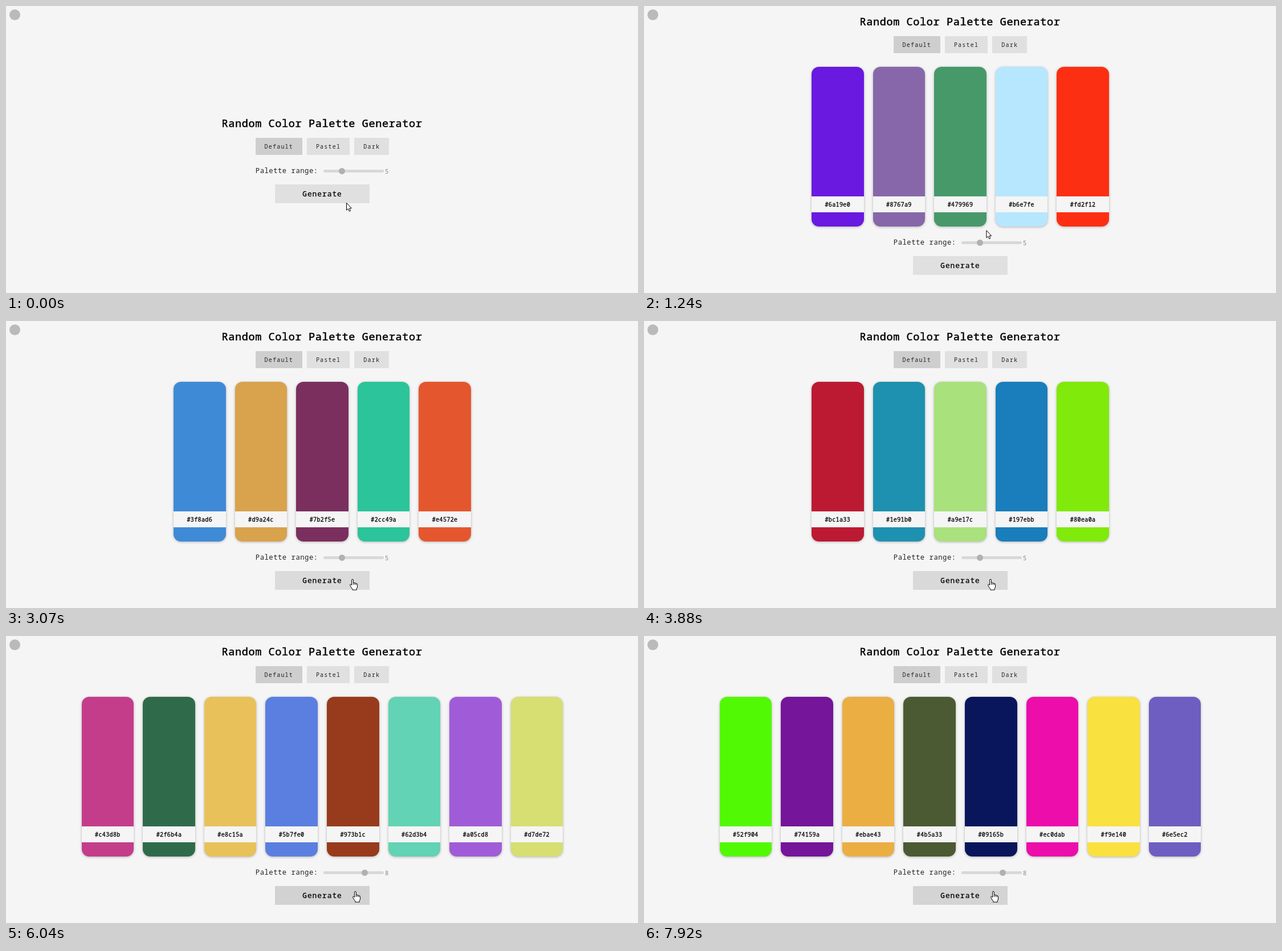
Recreate the animation shown at these times as an HTML page. Size 1109x505 px, loop 7.99 s.

```html
<!DOCTYPE html>
<html lang="en">
<head>
<meta charset="utf-8">
<title>Random Color Palette Generator</title>
<style>
  html, body { margin: 0; width: 100%; height: 100%; overflow: hidden; background: #f5f5f5; }
  body { position: relative; font-family: "Noto Sans Mono", "DejaVu Sans Mono", monospace; color: #111; }
  body * { box-sizing: border-box; }
  #stage div, #stage span { position: absolute; white-space: nowrap; }
  #stage { position: absolute; left: 0; top: 0; width: 1109px; height: 505px; overflow: hidden; }
  #badge { left: 6px; top: 6px; width: 19px; height: 19px; border-radius: 50%; background: #bababa; }
  #page, #cards, #lower { left: 0; top: 0; width: 1109px; height: 0; }
  #title, #go, .card span { color: #000; -webkit-text-stroke: .3px #000; }
  #title { left: 378.5px; top: 12px; line-height: 30px; font-size: 18.5px; letter-spacing: .63px; -webkit-text-stroke-width: .5px; }
  .tab { top: 53px; height: 30px; line-height: 30px; padding-left: 16.1px; font-size: 10px; letter-spacing: 1.2px; background: #e0e0e0; color: #222; }
  .tab.on { background: #cecece; }
  .card { top: 107px; width: 91.6px; height: 281px; border-radius: 13px; box-shadow: 0 1px 4px rgba(0, 0, 0, .28); }
  .card span { left: 0; top: 228px; width: 100%; height: 28px; line-height: 28px; text-align: center; background: #f5f5f5; font-size: 10px; letter-spacing: .38px; }
  #range { left: 437.8px; top: 101px; line-height: 20px; font-size: 12.2px; letter-spacing: .53px; color: #222; }
  #track { left: 557px; top: 109px; width: 105.5px; height: 5px; border-radius: 3px; background: #d8d8d8; }
  #thumb { top: 106px; width: 11px; height: 11px; border-radius: 50%; background: #b1b1b1; }
  #count { left: 665px; top: 102px; line-height: 20px; font-size: 10.5px; color: #858585; }
  #go { left: 472px; top: 135px; width: 166px; height: 32.5px; line-height: 32px; text-align: center; font-size: 12.8px; letter-spacing: 1.02px; }
  #cursor { position: absolute; left: 0; top: 0; width: 30px; height: 30px; overflow: visible; }
  #cursor path { fill: #fff; stroke: #000; stroke-width: 1; stroke-linejoin: round; }
</style>
</head>
<body>
<div id="stage">
  <div id="badge"></div>
  <div id="page">
    <div id="title">Random Color Palette Generator</div>
    <div class="tab on" style="left:437.5px;width:82.5px">Default</div>
    <div class="tab" style="left:527.8px;width:75.7px">Pastel</div>
    <div class="tab" style="left:611.2px;width:61px">Dark</div>
    <div id="cards"></div>
    <div id="lower">
      <div id="range">Palette range:</div>
      <div id="track"></div>
      <div id="thumb"></div>
      <div id="count"></div>
      <div id="go">Generate</div>
    </div>
  </div>
  <svg id="cursor">
    <path id="arrow" d="M.5 .5V13.4L3.4 10.7L5.4 15.2L7.5 14.3L5.6 9.9H9.3Z"/>
    <g id="hand">
      <path d="M-1.4 11V1.9Q-1.4 .4 0 .4T1.4 1.9V6.6Q2.8 5.6 4 7.2Q5.4 6.4 6.4 8Q8.6 7.4 8.6 9.6V13Q8.6 15.2 7.2 17V19.2H-.2V17.4Q-2 15.6-4.2 11.4Q-5 9.6-3.6 9.2Q-2.4 9-1.4 11Z"/>
      <path d="M1.4 6.6V10M4 7.2V10M6.4 8V10.4" style="fill:none"/>
    </g>
  </svg>
</div>
<script>
const LOOP = 7990, START = 476, SLIDE = 330, PITCH = 107.6, CARD = 91.6;
const $ = id => document.getElementById(id);

// Each palette and the time of the click that shows it
const palettes = [
  [0, ""],
  [START, "6a19e0 8767a9 479969 b6e7fe fd2f12"],
  [1850, "ca1803 91ec51 64ad00 68058d babc61"],
  [2940, "3f8ad6 d9a24c 7b2f5e 2cc49a e4572e"],
  [3730, "bc1a33 1e91b0 a9e17c 197ebb 80ea0a"],
  [5820, "c43d8b 2f6b4a e8c15a 5b7fe0 973b1c 62d3b4 a05cd8 d7de72"],
  [6730, "535725 5027b5 3a72ac c8586f 6f5c4d 48f3f5 7ef22e 706b98"],
  [7720, "52f904 74159a ebae43 4b5a33 09165b ec0dab f9e140 6e5ec2"]
];

// Pointer hotspot: time, x, y
const path = [
  [70, 597, 346], [300, 592, 329], [880, 592, 329], [1580, 608, 454],
  [3990, 608, 454], [4490, 587, 412], [4550, 587, 411], [4720, 589, 405],
  [5290, 630.5, 415], [5420, 630.5, 415], [5780, 613, 449]
];
const handSpans = [[140, START], [1400, 4150], [4420, 5480], [5650, LOOP]];

// Button darkness: time, level; a click drops it to zero, then it returns
const press = t => [[t, 0], [t + 80, 0], [t + 260, 1]];
const shade = [
  [140, 0], [320, 1], [START, 1], [600, 0], [1400, 0], [1580, 1],
  [1850, 1], ...press(1850), [2940, 1], ...press(2940), [3730, 1], ...press(3730),
  [4150, 1], [4330, 0], [5650, 0], [5820, 1], ...press(5820),
  [6730, 1], ...press(6730), [7720, 1], ...press(7720)
];

const linear = p => p;
const smooth = p => p * p * (3 - 2 * p);

// CSS "ease": cubic-bezier(.25, .1, .25, 1)
function ease(p) {
  let lo = 0, hi = 1, s;
  for (let i = 0; i < 24; i++) {
    s = (lo + hi) / 2;
    const x = .75 * s * (1 - s) ** 2 + .75 * s * s * (1 - s) + s ** 3;
    if (x < p) lo = s; else hi = s;
  }
  return .3 * s * (1 - s) ** 2 + 3 * s * s * (1 - s) + s ** 3;
}

function sample(keys, t, curve) {
  let i = -1;
  while (i + 1 < keys.length && keys[i + 1][0] <= t) i++;
  const a = keys[Math.max(i, 0)], b = keys[Math.min(i + 1, keys.length - 1)];
  const p = b[0] > a[0] ? curve((t - a[0]) / (b[0] - a[0])) : 0;
  return a.slice(1).map((v, k) => v + (b[k + 1] - v) * p);
}

let shown = -1;
function showPalette(index) {
  if (index === shown) return;
  shown = index;
  const colors = palettes[index][1].split(" ").filter(Boolean);
  const left = 555 - ((colors.length - 1) * PITCH + CARD) / 2;
  $("cards").innerHTML = colors.map((c, i) =>
    `<div class="card" style="left:${left + i * PITCH}px;background:#${c}"><span>#${c}</span></div>`).join("");
}

function draw(t) {
  showPalette(palettes.findLastIndex(p => p[0] <= t));

  const slide = ease(Math.min(Math.max((t - START) / SLIDE, 0), 1));
  $("page").style.transform = `translateY(${179 * (1 - slide)}px)`;
  $("lower").style.transform = `translateY(${t < START ? 0 : 305}px)`;

  const [x, y] = sample(path, t, smooth);
  const hand = handSpans.some(([a, b]) => t >= a && t < b);
  $("cursor").style.transform = `translate(${x}px, ${y}px)`;
  $("hand").style.display = hand ? "" : "none";
  $("arrow").style.display = hand ? "none" : "";

  const value = t < 4550 ? 5 : t < 5290 ? Math.round(3 + (x - 563) / 13.4) : 8;
  $("thumb").style.left = 557.3 + (value - 3) * 13.4 + "px";
  $("count").textContent = value;

  const gray = Math.round(224 - 18 * sample(shade, t, linear)[0]);
  $("go").style.background = `rgb(${gray}, ${gray}, ${gray})`;
}

let origin;
function tick() {
  const now = performance.now();
  origin ??= now;
  draw((now - origin) % LOOP);
  requestAnimationFrame(tick);
}
tick();
</script>
</body>
</html>
```
